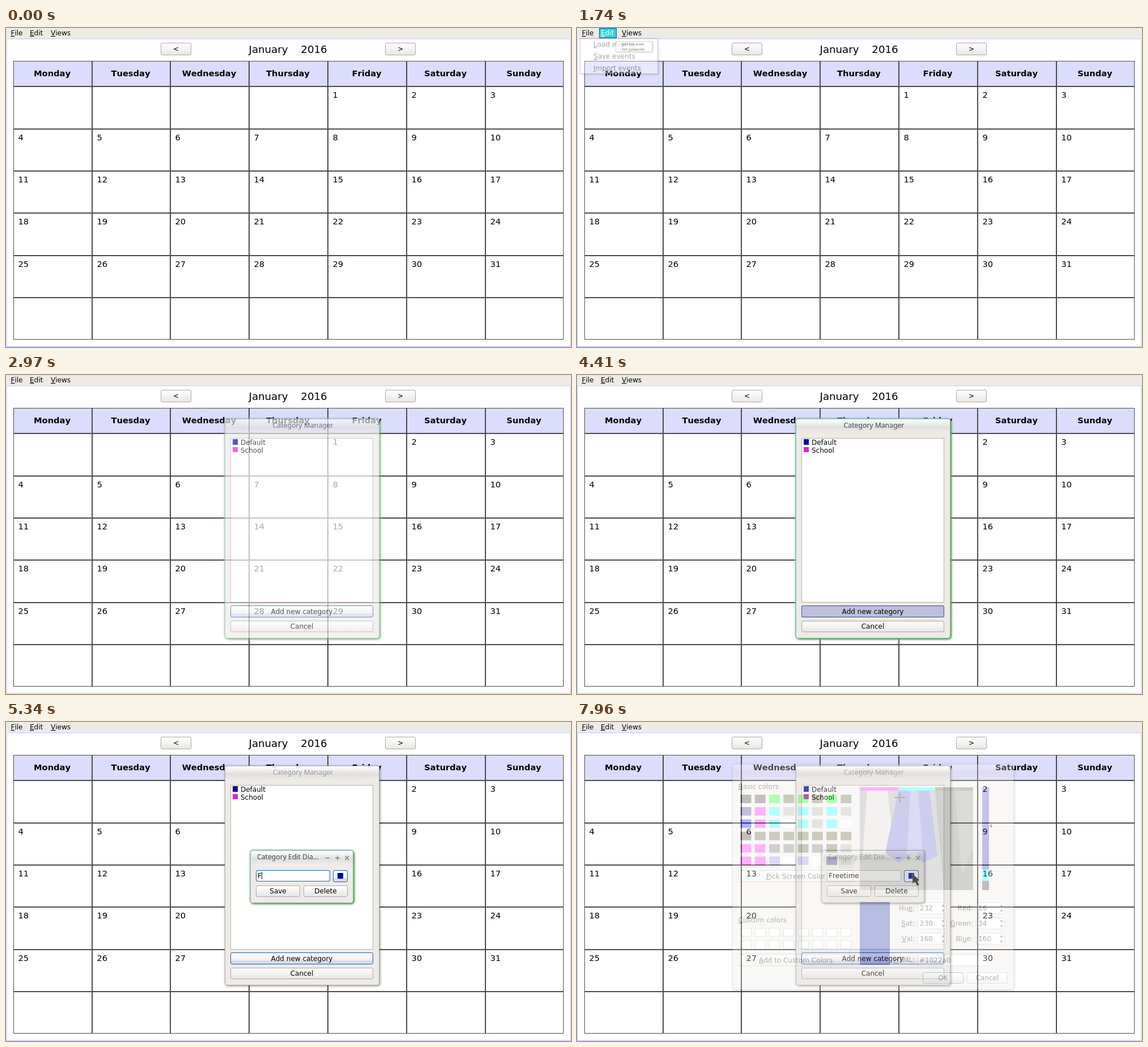
These frames come from a looping animation (997x562 px, 8 s). An HTML page:

```html
<!DOCTYPE html>
<html lang="en">
<head>
<meta charset="utf-8">
<title>Calendar</title>
<style>
html, body { margin: 0; width: 100%; height: 100%; overflow: hidden; background: #fff; }
svg { display: block; width: 997px; height: 562px; }
text { font: 12px "DejaVu Sans", sans-serif; font-kerning: none; fill: #000; white-space: pre; }
.mid { text-anchor: middle; }
.end { text-anchor: end; }
.day { font-size: 14.67px; }
.head { font-size: 14.67px; font-weight: bold; }
.month { font-size: 18.2px; }
.title { font: 12.2px "Noto Sans", sans-serif; fill: #979aa2; }
.title.live { fill: #515a66; }
.light { fill: #fff; }
.hint { fill: #8c8c8c; }
.cell { fill: #fff; stroke: #4b4b4b; }
.cell.top { fill: #dcdcff; }
.btn { fill: url(#face); stroke: #aaa7a3; }
.btn.focus { fill: url(#focusFace); stroke: #0f5fac; }
.btn.hover { fill: url(#hoverFace); stroke: #0f5fac; }
.btn.down { fill: #bfbedc; stroke: #0f5fac; }
.field { fill: #fff; stroke: #b5b2ae; }
.field.focus { stroke: #0f5fac; }
.hot { fill: #2ad5d5; stroke: #0d5c9f; }
.popup { fill: #fff; stroke: #77777a; }
.win { fill: #eeebe7; stroke: #b0adaa; }
.shade { filter: drop-shadow(1px 1px 2px #0007); }
.glow { fill: #9ce89c; filter: drop-shadow(-1px -1px 1px #86e6dc) drop-shadow(2px 2px 1.5px #62e562); }
.icons { fill: none; stroke: #777c84; stroke-width: 1.4; }

#stage [class*="a-"] { animation: 8s step-end infinite; }
#stage .a-fileHot { animation-name: fileHot; }
#stage .a-editHot { animation-name: editHot; }
#stage .a-fileMenu, #stage .a-editMenu { transform-box: fill-box; transform-origin: 36% 23%; }
#stage .a-fileMenu { animation-name: fileMenu; }
#stage .a-editMenu { animation-name: editMenu; }
#stage .a-item1 { animation-name: item1; }
#stage .a-item2 { animation-name: item2; }
#stage .a-manager { animation-name: manager; }
#stage .a-managerLive { animation-name: managerLive; }
#stage .a-addHover { animation-name: addHover; }
#stage .a-addDown { animation-name: addDown; }
#stage .a-editor { animation-name: editor; }
#stage .a-editorLive { animation-name: editorLive; }
#stage .a-hint { animation-name: hint; }
#stage .a-typing { animation-name: typing; }
#stage .a-caret { animation-name: caret; }
#stage .a-swatchHover { animation-name: swatchHover; }
#stage .a-swatchDown { animation-name: swatchDown; }
#stage .a-picker { animation-name: picker; }
#stage .a-pointer { animation-name: pointer; }

@keyframes fileHot { 0% { opacity: 0 } 17% { opacity: 1 } 21.25% { opacity: 0 } }
@keyframes editHot { 0% { opacity: 0 } 21.25% { opacity: 1 } 36.125% { opacity: 0 } }
@keyframes fileMenu {
  0% { opacity: 0; transform: scale(.44) }
  17% { opacity: .6; transform: scale(.44) }
  17.5% { opacity: .75; transform: scale(.62) }
  18% { opacity: .85; transform: scale(.78) }
  18.5% { opacity: .95; transform: scale(.91) }
  19% { opacity: 1; transform: none }
  21.25% { opacity: .7 } 21.75% { opacity: .35 } 22.25% { opacity: 0 }
}
@keyframes editMenu {
  0% { opacity: 0; transform: scale(.44) }
  21.75% { opacity: .6; transform: scale(.44) }
  22.25% { opacity: .75; transform: scale(.62) }
  22.75% { opacity: .85; transform: scale(.78) }
  23.25% { opacity: .95; transform: scale(.91) }
  23.75% { opacity: 1; transform: none }
  36.125% { opacity: .5 } 36.625% { opacity: 0 }
}
@keyframes item1 { 0% { opacity: 0 } 25.5% { opacity: 1 } 27.875% { opacity: 0 } }
@keyframes item2 { 0% { opacity: 0 } 27.875% { opacity: 1 } }
@keyframes manager { 0% { opacity: 0 } 36.625% { opacity: .3 } 37.125% { opacity: .67 } 37.625% { opacity: 1 } }
@keyframes managerLive { 0% { opacity: 1 } 58.125% { opacity: 0 } }
@keyframes addHover {
  0% { opacity: 0 } 47.375% { opacity: 1 } 59.625% { opacity: .8 } 60.125% { opacity: .6 }
  60.625% { opacity: .4 } 61.125% { opacity: .2 } 61.625% { opacity: 0 }
}
@keyframes addDown { 0% { opacity: 0 } 55.125% { opacity: 1 } 56.5% { opacity: 0 } }
@keyframes editor { 0% { opacity: 0 } 58.125% { opacity: .3 } 58.625% { opacity: .67 } 59.125% { opacity: 1 } }
@keyframes editorLive { 0% { opacity: 1 } 99.5% { opacity: 0 } }
@keyframes hint { 0% { opacity: 1 } 66.75% { opacity: 0 } }
@keyframes typing {
  0% { transform: none }
  66.75% { transform: translateX(7px) }
  69.625% { transform: translateX(12px) }
  71.75% { transform: translateX(19px) }
  73.375% { transform: translateX(27px) }
  75.875% { transform: translateX(31px) }
  77.875% { transform: translateX(35px) }
  79.625% { transform: translateX(46px) }
  80.625% { transform: translateX(54px) }
}
@keyframes caret { 0% { opacity: 1 } 88.125% { opacity: 0 } }
@keyframes swatchHover { 0% { opacity: 0 } 91.125% { opacity: 1 } }
@keyframes swatchDown { 0% { opacity: 0 } 97.75% { opacity: 1 } 99% { opacity: 0 } }
@keyframes picker { 0% { opacity: 0 } 99.5% { opacity: .3 } }
@keyframes pointer {
  0% { opacity: 0; transform: translate(588px, 307px) }
  88.125% { opacity: 1; transform: translate(588px, 307px); animation-timing-function: steps(7) }
  91.625% { opacity: 1; transform: translate(591px, 277px); animation-timing-function: steps(5) }
  94.125% { opacity: 1; transform: translate(591px, 267px) }
  100% { opacity: 1; transform: translate(591px, 267px) }
}
</style>
</head>
<body>
<svg id="stage" viewBox="0 0 997 562">
  <defs>
    <linearGradient id="face" x2="0" y2="1"><stop stop-color="#fff"/><stop offset="1" stop-color="#e9e7e4"/></linearGradient>
    <linearGradient id="focusFace" x2="0" y2="1">
      <stop stop-color="#fff"/><stop offset=".68" stop-color="#f0eff0"/><stop offset=".72" stop-color="#d3d3ee"/><stop offset="1" stop-color="#dfdff2"/>
    </linearGradient>
    <linearGradient id="hoverFace" x2="0" y2="1"><stop stop-color="#fff"/><stop offset=".3" stop-color="#f4f3f8"/><stop offset="1" stop-color="#d0d0ee"/></linearGradient>
    <linearGradient id="bar" x2="0" y2="1"><stop stop-color="#fff"/><stop offset=".5" stop-color="#e6e5e3"/><stop offset=".55" stop-color="#e0dfdd"/><stop offset="1" stop-color="#eeebe7"/></linearGradient>
    <linearGradient id="ramp" x2="0" y2="1">
      <stop stop-color="#4444c8"/><stop offset=".8" stop-color="#2a2aa8"/><stop offset=".8" stop-color="#0ff"/>
      <stop offset=".91" stop-color="#0ff"/><stop offset=".91" stop-color="#282864"/><stop offset="1" stop-color="#222"/>
    </linearGradient>
  </defs>
</svg>
<script>
const stage = document.getElementById('stage');

const text = (x, y, s, cls = '') =>
  `<text x="${x}" y="${y}" class="${cls}">${s.replace(/_(.)/, '<tspan text-decoration="underline">$1</tspan>')}</text>`;
const fill = (x, y, w, h, c) => `<rect x="${x}" y="${y}" width="${w}" height="${h}" fill="${c}"/>`;
const box = (x, y, w, h, cls, r = 0) =>
  `<rect x="${x + .5}" y="${y + .5}" width="${w - 1}" height="${h - 1}" rx="${r}" class="${cls}"/>`;
const group = (cls, ...parts) => `<g class="${cls}">${parts.join('')}</g>`;
const label = (x, y, w, h, s) => text(x + w / 2, y + h / 2 + 4, s, 'mid');
const button = (x, y, w, h, s, cls = '') => box(x, y, w, h, 'btn ' + cls, 2.5) + label(x, y, w, h, s);

function calendar() {
  const cols = [13, 152, 290, 429, 568, 707, 846, 984];
  const rows = [58, 103, 178, 252, 326, 401, 475, 549];
  const names = ['Monday', 'Tuesday', 'Wednesday', 'Thursday', 'Friday', 'Saturday', 'Sunday'];
  let out = fill(0, 0, 997, 18, '#eeebe7') +
    '<rect x="1" y="19" width="995" height="542" fill="#fff" stroke="#dcdcff" stroke-width="2"/>' +
    text(8.5, 13, '_File') + text(42, 13, '_Edit') + text(79, 13, '_Views') +
    button(273, 26, 54, 22, '&lt;') + button(669, 26, 54, 22, '&gt;') +
    text(463, 44, 'January', 'month mid') + text(543.5, 44, '2016', 'month mid');
  for (let r = 0; r < 7; r++) {
    for (let c = 0; c < 7; c++) {
      const x = cols[c], y = rows[r], w = cols[c + 1] - x, h = rows[r + 1] - y;
      const day = (r - 1) * 7 + c - 3;
      out += box(x, y, w, h, r ? 'cell' : 'cell top');
      if (!r) out += text(x + w / 2 - 1, 85, names[c], 'head mid');
      else if (day > 0 && day < 32) out += text(x + 8.5, y + 19.5, String(day), 'day');
    }
  }
  return out;
}

const hotTitle = (x, w, tx, s, cls) => group(cls, box(x, 0, w, 18, 'hot'), text(tx, 13, s, 'light'));

function popup(x, w, items, cls) {
  const row = (s, i, c) => text(x + 24, 33 + i * 21, s, c);
  return group(cls,
    group('shade', box(x, 18, w, items.length * 21, 'popup')),
    ...items.map((s, i) => row(s, i)),
    ...(cls === 'a-editMenu' ? items.map((s, i) =>
      group('a-item' + (i + 1), box(x, 18 + i * 21, w, 21, 'hot'), row(s, i, 'light'))) : []));
}

function frame(x, y, w, h, title, tx, cls, live) {
  return (live ? group(live, `<rect x="${x}" y="${y}" width="${w}" height="${h}" rx="5" class="glow"/>`) : '') +
    group('shade', box(x, y, w, h, 'win', 4)) +
    `<rect x="${x + 1}" y="${y + 1}" width="${w - 2}" height="24" rx="4" fill="url(#bar)"/>` +
    text(tx, y + 15.5, title, 'title ' + cls) +
    (live ? group(live, text(tx, y + 15.5, title, 'title live ' + cls)) : '');
}

function manager() {
  const add = [396, 406, 252, 21];
  return group('a-manager',
    frame(386, 77, 273, 387, 'Category Manager', 524, 'mid', 'a-managerLive'),
    box(396, 111, 252, 290, 'field'),
    fill(400, 113, 9, 10, '#0000a8'), text(414, 122.5, 'Default'),
    fill(400, 127, 9, 9, '#d428d4'), text(414, 136.5, 'School'),
    box(...add, 'btn focus', 2.5),
    group('a-addHover', box(...add, 'btn hover', 2.5)),
    group('a-addDown', box(...add, 'btn down', 2.5)),
    label(...add, 'Add new category'),
    button(396, 433, 252, 20, 'Cancel'));
}

function editor() {
  const input = [441, 261, 131, 20], swatch = [577, 261, 26, 21];
  return group('a-editor',
    frame(431, 226, 182, 93, 'Category Edit Dia...', 443, '', 'a-editorLive'),
    '<path class="icons" d="M563 239.5h8M581 239.5h8M585 235.5v8M598.5 236l6.500 7M605 236l-6.500 7"/>',
    box(...input, 'field', 2.5),
    text(444, 275, 'Freetime'),
    group('a-typing', fill(444.5, 263, 56, 16, '#fff'), group('a-caret', fill(444, 264, 1, 13, '#000'))),
    group('a-hint', text(444.5, 275, 'Enter category name', 'hint')),
    group('a-editorLive', `<g fill-opacity="0">${box(...input, 'focus field" style="fill:none', 2.5)}</g>`),
    box(...swatch, 'btn focus', 2.5),
    group('a-swatchHover', `<g>${box(...swatch, 'btn focus" style="fill:#f5f5fb', 2.5)}</g>`),
    group('a-swatchDown', box(...swatch, 'btn down', 2.5)),
    fill(585, 266, 10, 10, '#0000a8'),
    button(441, 288, 78, 20, 'Save'),
    button(525, 288, 78, 20, 'Delete'));
}

function picker() {
  const tint = {
    k: '#282828', r: '#4c2828', g: '#0f0', o: '#555528', b: '#282882', p: '#f0f',
    c: '#0ff', l: '#a7a79b', w: '#fff', B: '#00f', v: '#8282e4', s: '#666664'
  };
  const basic = ['krgogogo', 'bpclclcl', 'Bpcwclcw', 'rooooooo', 'ppssosol', 'ppvwvwbl'];
  const at = i => 288.5 + i * 25.25;
  let out = frame(274, 74, 497, 398, 'Select Color', 524, 'mid') +
    text(284.5, 117.5, '_Basic colors') + text(284.5, 352.5, '_Custom colors');
  basic.forEach((row, j) => [...row].forEach((k, i) => {
    out += fill(at(i), 128 + j * 21.8, 19, 15, tint[k]);
  }));
  out += '<rect x="463" y="235" width="24" height="20" fill="none" stroke="#999"/>';
  for (let i = 0; i < 16; i++)
    out += box(Math.round(at(i % 8)), i < 8 ? 363 : 385, 19, 15, 'field');
  out += button(285, 261, 202, 21, '_Pick Screen Color') + button(285, 409, 202, 21, '_Add to Custom Colors');

  // hue and saturation field with its soft cones
  out += fill(499, 115, 200, 181, '#9a9a98') +
    '<path fill="#d8d5cf" d="M512 121h36l12 112h-56z"/>' +
    '<path fill="#6c6c66" d="M632 121h67v175h-52z"/>' +
    '<path fill="#85857f" d="M667 121h32v100l-20 50z"/>' +
    '<path fill="#5a5ac8" d="M567 121h55l14 115-26 12-12-20-30 20-24-18z"/>' +
    '<path fill="#8888dc" d="M588 121h14l8 107-28 6z"/>' +
    fill(499, 115, 68, 6, '#f0f') + fill(567, 115, 65, 6, '#0ff') + fill(632, 115, 67, 6, '#555528') +
    '<path stroke="#000" stroke-width="2" d="M560 133h19M569.500 124v18"/>' +
    fill(715, 115, 12, 181, 'url(#ramp)') + '<path d="M728 183l4-4v8z"/>' +
    fill(499, 317, 53, 111, '#1022a0');

  const spin = (x, y, name, value) => text(x - 5, y + 4, name, 'end') + box(x, y - 10, 51, 20, 'field', 2) +
    text(x + 4, y + 4, value) + `<path fill="#555" d="M${x + 42} ${y - 3}h6l-3-4zM${x + 42} ${y + 3}h6l-3 4z"/>`;
  const rows = [['Hu_e:', '232', 'Red:', '16'], ['_Sat:', '230', '_Green:', '34'], ['_Val:', '160', 'Bl_ue:', '160']];
  rows.forEach(([a, n, b, m], i) => { out += spin(601, 328 + i * 27, a, n) + spin(704, 328 + i * 27, b, m); });
  out += text(596, 423, '_HTML:', 'end') + box(601, 409, 128, 21, 'field', 2) + text(604, 423.5, '#1022a0') +
    button(610, 441, 72, 20, 'OK', 'focus') + button(688, 441, 72, 20, 'Cancel');
  return group('a-picker', out);
}

const pointer = group('a-pointer',
  '<path d="M.5.5 1.500 17.500 5.500 14.500 9.500 21.500 12.500 19.500 9 13 13 11.500z" fill="#484c46" stroke="#858a80" stroke-width=".7"/>');

stage.insertAdjacentHTML('beforeend', [
  calendar(),
  hotTitle(5, 28, 8.5, '_File', 'a-fileHot'),
  hotTitle(39, 31, 42, '_Edit', 'a-editHot'),
  popup(5, 138, ['_Load events', '_Save events', '_Import events'], 'a-fileMenu'),
  popup(39, 146, ['_Add new event', 'Edit _Categories'], 'a-editMenu'),
  manager(), editor(), picker(), pointer
].join(''));
</script>
</body>
</html>
```
